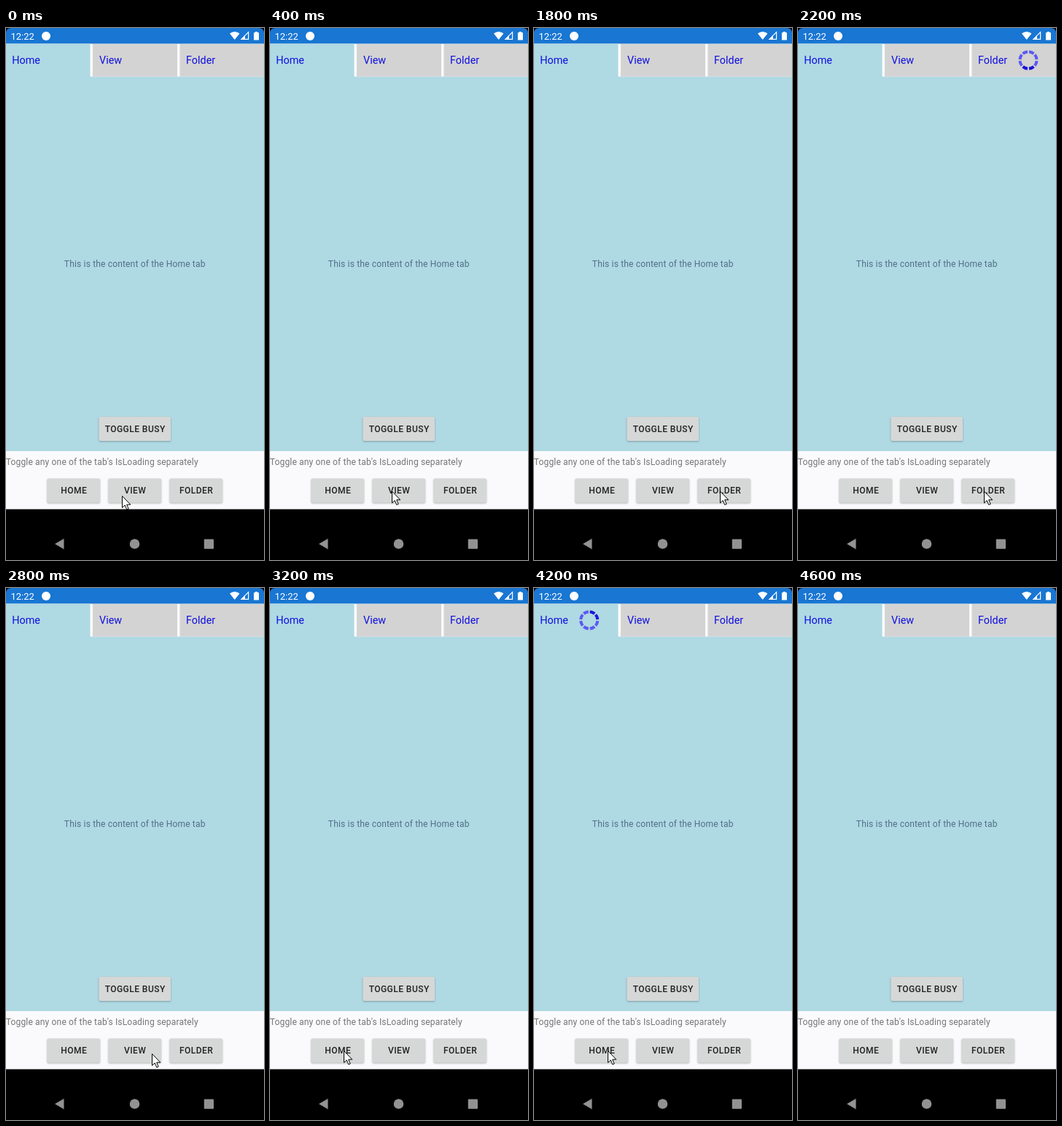
Write an HTML page that moves like this. It is 354x728 px and loops after 5200 ms.

```html
<!DOCTYPE html>
<html lang="en">
<head>
<meta charset="utf-8">
<title>Tabs with busy indicators</title>
<style>
  html, body { margin: 0; width: 100%; height: 100%; overflow: hidden; background: #000; }
  svg { display: block; width: 354px; height: 728px; font-family: Roboto, sans-serif; }
  .tab { font-size: 14.4px; fill: #1010e0; }
  .body { font-size: 12.06px; letter-spacing: .15px; }
  .button rect { fill: #d6d7d7; filter: drop-shadow(0 1px 1px rgba(0, 0, 0, .28)); }
  .button text { font-size: 12.06px; font-weight: 500; letter-spacing: .43px; fill: #212121; text-anchor: middle; }
</style>
</head>
<body>
<svg viewBox="0 0 354 728">
  <rect width="354" height="728"/>
  <path d="M0 22V7Q0 0 7 0H347Q354 0 354 7V22Z" fill="#1976d2"/>
  <g fill="#fff">
    <text x="6.5" y="15.5" font-size="13">12:22</text>
    <circle cx="55" cy="11" r="6"/>
    <path d="M307 7.6Q313.7 2.6 320.5 7.6L313.7 16Z"/>
    <path d="M323 15.3H332.6V5.6Z" fill="none" stroke="#fff" stroke-width="1.2"/>
    <path d="M322 16L328 10V16Z"/>
    <path d="M340 6.2H342V5H345V6.2H347V16.5H340Z"/>
  </g>

  <rect y="21.5" width="354" height="46" fill="#fafafa"/>
  <rect y="66.5" width="354" height="513" fill="#afd9e3"/>
  <rect y="21.5" width="115.5" height="46" fill="#afd9e3"/>
  <path d="M119 22H235V66.5H119ZM238.5 22H354V66.5H238.5Z" fill="#d3d3d3"/>
  <g class="tab">
    <text x="8.2" y="49">Home</text>
    <text x="128" y="49">View</text>
    <text x="247" y="49">Folder</text>
  </g>
  <text class="body" x="176.7" y="327" text-anchor="middle" fill="#526f88">This is the content of the Home tab</text>

  <rect y="579" width="354" height="79.5" fill="#fafafc"/>
  <text class="body" x="-.3" y="598" fill="#757575">Toggle any one of the tab's IsLoading separately</text>
  <g id="buttons"></g>

  <g fill="#929292">
    <path d="M67 706L79.5 698.7V713.3Z"/>
    <circle cx="176.5" cy="706" r="6.8"/>
    <rect x="271.8" y="699.5" width="13.2" height="13.2" rx="1"/>
  </g>

  <g id="spinner" fill="none" stroke-width="4"></g>
  <path id="cursor" d="M.5 .5V16.5L4.2 13L6.8 19L9.2 18L6.7 12.2H11.8Z" fill="#fff" stroke="#000"/>
</svg>
<script>
const $ = id => document.getElementById(id);
const LOOP = 5200, TICK = 200, SEGMENTS = 8, SEGMENT_MS = 75;

// [label, x, y, width]
const buttons = [
  ['TOGGLE BUSY', 127.5, 532, 98.5],
  ['HOME', 56.5, 616.5, 72.5],
  ['VIEW', 140.5, 616.5, 72.5],
  ['FOLDER', 224.5, 616.5, 72.5],
];
$('buttons').innerHTML = buttons.map(([label, x, y, w]) =>
  `<g class="button"><rect x="${x}" y="${y}" width="${w}" height="33" rx="1.5"/>
   <text x="${x + w / 2 + .4}" y="${y + 20.8}">${label}</text></g>`).join('');

// Ring of arcs around the origin
const point = deg => {
  const a = deg * Math.PI / 180;
  return `${11.6 * Math.sin(a)} ${-11.6 * Math.cos(a)}`;
};
$('spinner').innerHTML = Array.from({ length: SEGMENTS }, (_, i) =>
  `<path d="M${point(i * 45 + 5)}A11.6 11.6 0 0 1 ${point(i * 45 + 40)}"/>`).join('');
const arcs = [...$('spinner').children];

// Leading segment is `head` at time `ref`
const busy = [
  { from: 600, to: 1400, x: 187.5, ref: 1000, head: 6 },
  { from: 2000, to: 2800, x: 316, ref: 2200, head: 4 },
  { from: 3400, to: 4400, x: 75.7, ref: 3800, head: 4 },
];

// Pointer stops: [time, x, y]
const stops = [
  [0, 159, 640], [200, 159, 639], [400, 167, 633.5], [1600, 255, 633.5],
  [2800, 200, 637], [3000, 111, 635], [3200, 101, 633],
];
const CURSOR_END = 4600;

function draw(now) {
  const t = Math.floor(now % LOOP / TICK) * TICK;

  const [, x, y] = stops.findLast(s => s[0] <= t);
  $('cursor').setAttribute('transform', `translate(${x} ${y})`);
  $('cursor').style.display = t < CURSOR_END ? '' : 'none';

  const spin = busy.find(b => t >= b.from && t < b.to);
  $('spinner').style.display = spin ? '' : 'none';
  if (spin) {
    $('spinner').setAttribute('transform', `translate(${spin.x} 44)`);
    const head = spin.head + Math.round((t - spin.ref) / SEGMENT_MS);
    arcs.forEach((arc, i) => {
      const lag = (head - i + 2 * SEGMENTS) % SEGMENTS;
      arc.setAttribute('stroke', lag < 2 ? '#1a14dc' : '#5c59f2');
    });
  }
}

const start = performance.now();
function frame() {
  draw(performance.now() - start);
  requestAnimationFrame(frame);
}
frame();
</script>
</body>
</html>
```
